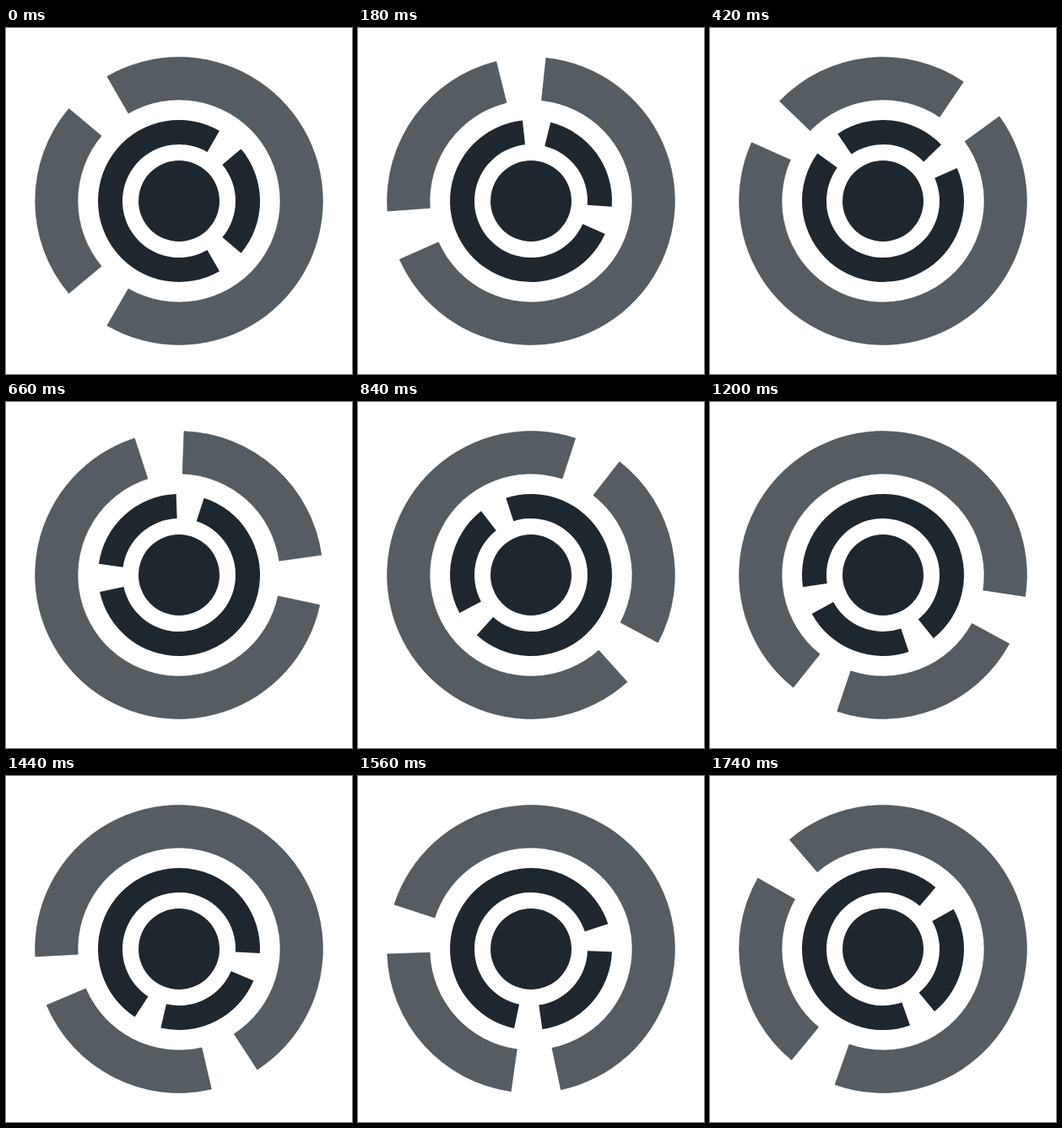
Animation of 410 by 410 pixels, one loop 1800 ms. Source, as an HTML page:

```html
<!DOCTYPE html>
<html lang="en">
<head>
<meta charset="utf-8">
<title>Counter-rotating rings</title>
<style>
  html, body { margin: 0; width: 100%; height: 100%; overflow: hidden; background: #fff; }
  svg { display: block; width: 100vw; height: 100vh; }
  .outer { fill: #565d62; stroke: #3c444a; stroke-width: .5; }
  .inner { fill: #1f272e; }
</style>
</head>
<body>
<svg viewBox="0 0 410 410">
  <g transform="translate(205 205)">
    <path id="outer" class="outer"/>
    <path id="inner" class="inner"/>
    <circle class="inner" r="48"/>
  </g>
</svg>
<script>
const STEP = 60, COUNT = 30;
// Rotation keys: [step, degrees], linear in between
const KEYS = [[0, 0], [15, 180], [22, 276], [30, 360]];

const point = (r, deg) => {
  const a = deg * Math.PI / 180;
  return `${(r * Math.cos(a)).toFixed(3)} ${(r * Math.sin(a)).toFixed(3)}`;
};

function sector(r0, r1, from, to) {
  const large = to - from > 180 ? 1 : 0;
  return `M${point(r1, from)}A${r1} ${r1} 0 ${large} 1 ${point(r1, to)}` +
         `L${point(r0, to)}A${r0} ${r0} 0 ${large} 0 ${point(r0, from)}Z`;
}

// A short piece around 0 degrees and a long one, with 20 degree gaps
const ring = (r0, r1) => sector(r0, r1, -40, 40) + sector(r0, r1, 60, 300);

function angleAt(step) {
  const i = KEYS.findIndex(([s]) => s > step);
  const [s0, a0] = KEYS[i - 1], [s1, a1] = KEYS[i];
  return a0 + (a1 - a0) * (step - s0) / (s1 - s0);
}

const outer = document.getElementById('outer');
const inner = document.getElementById('inner');
outer.setAttribute('d', ring(120, 170.4));
inner.setAttribute('d', ring(67, 96));

function draw(ms) {
  const angle = angleAt(Math.floor(ms / STEP) % COUNT);
  outer.setAttribute('transform', `rotate(${180 + angle})`);
  inner.setAttribute('transform', `rotate(${-angle})`);
}

const start = performance.now();
function tick() {
  draw(performance.now() - start);
  requestAnimationFrame(tick);
}
tick();
</script>
</body>
</html>
```
